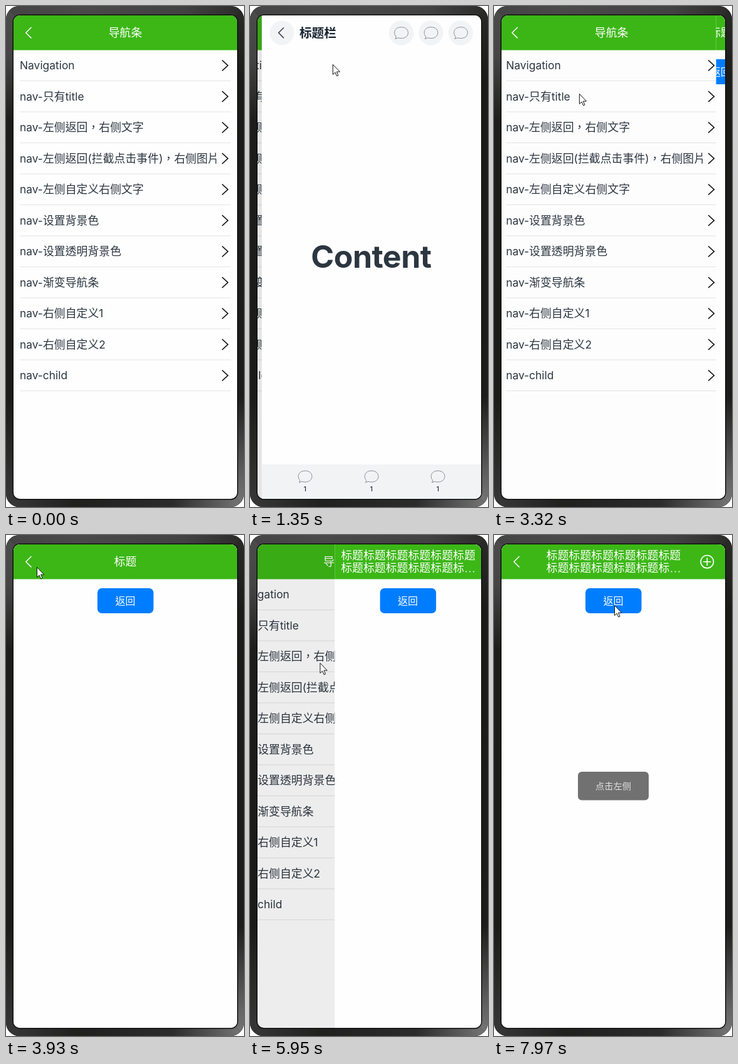
An HTML page that plays this animation: 380 by 800 pixels, repeating every 8 s.

```html
<!DOCTYPE html>
<html lang="zh-Hant">
<head>
<meta charset="utf-8">
<title>导航条</title>
<style>
  html, body { margin: 0; width: 100%; height: 100%; overflow: hidden; background: #fff; }
  svg { display: block; width: 100vw; height: 100vh; }
  text { font-family: Inter, 'Noto Sans CJK TC', 'Noto Sans CJK SC', 'Noto Sans CJK', sans-serif; white-space: pre; }
  .mid { text-anchor: middle; }
  .line { fill: none; stroke-linejoin: miter; }
</style>
</head>
<body>
<svg viewBox="0 0 380 800" lang="zh-Hant">
  <defs>
    <clipPath id="screen"><rect x="12" y="15" width="357" height="772" rx="10"/></clipPath>
    <clipPath id="reveal"><rect id="edge" x="12" y="15" width="357" height="772"/></clipPath>
    <linearGradient id="side" x1="0" y1="0" x2="0" y2="1">
      <stop offset="0" stop-color="#4c4c4c"/>
      <stop offset=".1" stop-color="#454545"/>
      <stop offset=".23" stop-color="#1d1d1b"/>
      <stop offset=".78" stop-color="#1b1b19"/>
      <stop offset="1" stop-color="#383838"/>
    </linearGradient>
    <linearGradient id="top" x1="0" y1="0" x2="1" y2="0">
      <stop offset="0" stop-color="#444"/>
      <stop offset=".3" stop-color="#4a4a4a"/>
      <stop offset=".75" stop-color="#424242"/>
      <stop offset="1" stop-color="#2b2b2a"/>
    </linearGradient>
    <linearGradient id="right" x1="0" y1="0" x2="0" y2="1">
      <stop offset="0" stop-color="#2b2b2a"/>
      <stop offset=".15" stop-color="#1b1b19"/>
      <stop offset=".78" stop-color="#1d1d1c"/>
      <stop offset=".95" stop-color="#666"/>
      <stop offset="1" stop-color="#777"/>
    </linearGradient>
    <linearGradient id="bottom" x1="0" y1="0" x2="1" y2="0">
      <stop offset="0" stop-color="#383838"/>
      <stop offset=".3" stop-color="#20201f"/>
      <stop offset=".7" stop-color="#2c2c2c"/>
      <stop offset="1" stop-color="#777"/>
    </linearGradient>
    <clipPath id="body"><rect width="380" height="800" rx="21"/></clipPath>
  </defs>

  <g clip-path="url(#body)">
    <rect width="380" height="800" fill="#1b1b19"/>
    <path d="M0 0L16 18V782L0 800Z" fill="url(#side)"/>
    <path d="M380 0L364 18V782L380 800Z" fill="url(#right)"/>
    <path d="M0 0H380L364 18H16Z" fill="url(#top)"/>
    <path d="M0 800H380L364 782H16Z" fill="url(#bottom)"/>
    <rect x="10.5" y="13.5" width="360" height="775" rx="11.5" fill="#111"/>
  </g>

  <g clip-path="url(#screen)">
    <rect x="12" y="15" width="357" height="772" fill="#fefefe"/>
    <g id="list"></g>
    <rect id="dim" x="12" y="15" width="357" height="772"/>
    <g clip-path="url(#reveal)"><g id="pages"></g></g>
    <g id="toast">
      <rect x="134" y="378" width="113" height="45.5" rx="6" fill="#4a4a4a"/>
      <text class="mid" x="190.5" y="406" font-size="14.2" fill="#fff" fill-opacity=".8">点击左侧</text>
    </g>
  </g>
  <path id="cursor" d="M.5 .5V16.5L4.2 13.2 6.7 19 9.1 18 6.6 12.2H11.7Z" fill="#fff" stroke="#111"/>
</svg>

<script>
const LOOP = 8000, W = 357, LEFT = 12;
const GREEN = '#3cb716', INK = '#2c3641';
const $ = id => document.getElementById(id);

const label = (x, y, s, size, fill, more = '') =>
  `<text x="${x}" y="${y}" font-size="${size}" fill="${fill}" ${more}>${s}</text>`;
const centered = (x, y, s, size, fill, more = '') => label(x, y, s, size, fill, 'class="mid" ' + more);
const stroke = (d, color, width) => `<path class="line" d="${d}" stroke="${color}" stroke-width="${width}"/>`;

// Latin runs are set a little smaller than the CJK ones
const mixed = s => s.replace(/[\x20-\x7e]+/g, run => `<tspan font-size="17.4">${run}</tspan>`);

const header = `<rect x="-200" y="15" width="800" height="55.5" fill="${GREEN}"/>` +
  stroke('M40.5 34L31.8 42.7L40.5 51.4', '#fff', 1.5);

const rows = ['Navigation', 'nav-只有title', 'nav-左侧返回，右侧文字',
  'nav-左侧返回(拦截点击事件)，右侧图片', 'nav-左侧自定义右侧文字', 'nav-设置背景色',
  'nav-设置透明背景色', 'nav-渐变导航条', 'nav-右侧自定义1', 'nav-右侧自定义2', 'nav-child'];

function listView() {
  const items = rows.map((s, i) => {
    const y = 95 + i * 49.5;
    return label(22, y + 6.3, mixed(s), 17.9, INK) +
      stroke(`M345 ${y - 8.5}L354.2 ${y}L345 ${y + 8.5}`, '#111', 1.7) +
      `<rect x="22" y="${y + 24}" width="337" height="1" fill="#e4e4e4"/>`;
  });
  return header + centered(190.5, 49, '导航条', 17.9, '#fff') + items.join('');
}

const bubble = (x, y) => `<path class="line" transform="translate(${x} ${y})" stroke="#8b8d91"
  d="M-8 6C-13 1 -11.5 -9 0 -9.3C8 -9.3 11 -4.5 11 -.3C11 5 6.5 8.6 0 8.6C-2 8.6 -3.5 8.3 -5 7.8L-9.5 9.5Z"/>`;
const disc = (x, r) => `<circle cx="${x}" cy="43" r="${r}" fill="#f2f3f5"/>`;

function contentView() {
  const tools = [238, 285.5, 333].map(x => disc(x, 19.7) + bubble(x, 43));
  const tabs = [84.5, 190.5, 296.5].map(x => bubble(x, 751.5) + centered(x, 774.5, '1', 10, '#182431', 'font-weight="500"'));
  return disc(47.5, 19.5) + stroke('M50.5 34.5L42.2 42.8L50.5 51.1', '#303a46', 1.5) +
    label(75.5, 49.5, '标题栏', 19.7, '#182431', 'font-weight="700"') + tools.join('') +
    centered(190, 418, 'Content', 50, INK, 'font-weight="700" letter-spacing="-.5"') +
    '<rect x="-200" y="732" width="800" height="60" fill="#f1f3f5"/>' + tabs.join('');
}

const backButton = '<rect x="146" y="85" width="89.5" height="40" rx="7" fill="#007dff"/>' +
  centered(190.5, 110.7, '返回', 16, '#fff', 'font-weight="500"');

const titleView = () => header + centered(190.5, 49, '标题', 17.9, '#fff') + backButton;

const longView = () => header +
  label(83.5, 38.6, '标题'.repeat(6), 17.9, '#fff') +
  label(83.5, 59.4, '标题'.repeat(5) + '标', 17.9, '#fff') +
  [283.5, 289.5, 295.5].map(x => `<circle cx="${x}" cy="58.6" r="1" fill="#fff"/>`).join('') +
  '<circle class="line" cx="340.3" cy="42.7" r="10.2" stroke="#fff" stroke-width="1.6"/>' +
  stroke('M340.3 36.5V48.9M334.1 42.7H346.5', '#fff', 1.6) + backButton;

$('list').innerHTML = listView();
$('pages').innerHTML = [contentView, titleView, longView].map(view =>
  `<g><rect x="-200" y="15" width="800" height="772" fill="#fefefe"/>${view()}</g>`).join('');
const pages = [...$('pages').children];

// start time, page, opens or closes
const moves = [[1033, 0, true], [2071, 0, false], [3304, 1, true], [4554, 1, false], [5830, 2, true]];

// time, x, y of the pointer tip
const path = [[280, 149, 270], [650, 77, 96], [1070, 77, 96], [1350, 132, 93], [1770, 50, 48],
  [2050, 48, 46], [2150, 65, 95], [2720, 135, 147], [3290, 135, 147], [3320, 136, 140],
  [3930, 49, 51], [4270, 49, 51], [4320, 40, 47], [4550, 40, 47], [4880, 120, 222],
  [5100, 127, 236], [5380, 127, 236], [5520, 125, 234], [5850, 125, 234], [6500, 38, 41],
  [6980, 38, 41], [7400, 196, 190], [7480, 206, 156], [7580, 203, 121], [7630, 203, 121], [7730, 192, 112]];

const clamp = v => Math.max(0, Math.min(1, v));

// critically damped spring, stiffness 342, damping 37
function spring(ms) {
  const x = 18.5 * ms / 1000;
  return 1 - (1 + x) * Math.exp(-x);
}

function pointer(t) {
  const i = path.findIndex(k => k[0] > t);
  if (i < 0) return path[path.length - 1].slice(1);
  const [t0, x0, y0] = path[i - 1], [t1, x1, y1] = path[i];
  const p = (t - t0) / (t1 - t0);
  return [x0 + (x1 - x0) * p, y0 + (y1 - y0) * p];
}

function render(t) {
  const move = moves.filter(m => m[0] <= t).pop();
  let open = 0;
  if (move) {
    const p = spring(t - move[0]);
    open = move[2] ? p : 1 - p;
  }
  if (open > 0.9995) open = 1;
  if (open < 0.0005) open = 0;

  const offset = W * (1 - open);
  $('list').setAttribute('transform', `translate(${-0.2 * W * open} 0)`);
  $('dim').setAttribute('opacity', 0.1 * open);
  $('edge').setAttribute('x', LEFT + offset);
  $('pages').setAttribute('transform', `translate(${offset / 2} 0)`);
  pages.forEach((page, i) => page.setAttribute('visibility', open && move[1] === i ? 'visible' : 'hidden'));

  $('toast').setAttribute('opacity', clamp((t - 6760) / 120) * (1 - clamp((t - 7850) / 550)));

  const shown = t >= 280;
  $('cursor').setAttribute('visibility', shown ? 'visible' : 'hidden');
  if (shown) $('cursor').setAttribute('transform', `translate(${pointer(t)})`);
}

const begin = performance.now();
function tick() {
  render((performance.now() - begin) % LOOP);
  requestAnimationFrame(tick);
}
tick();
</script>
</body>
</html>
```
